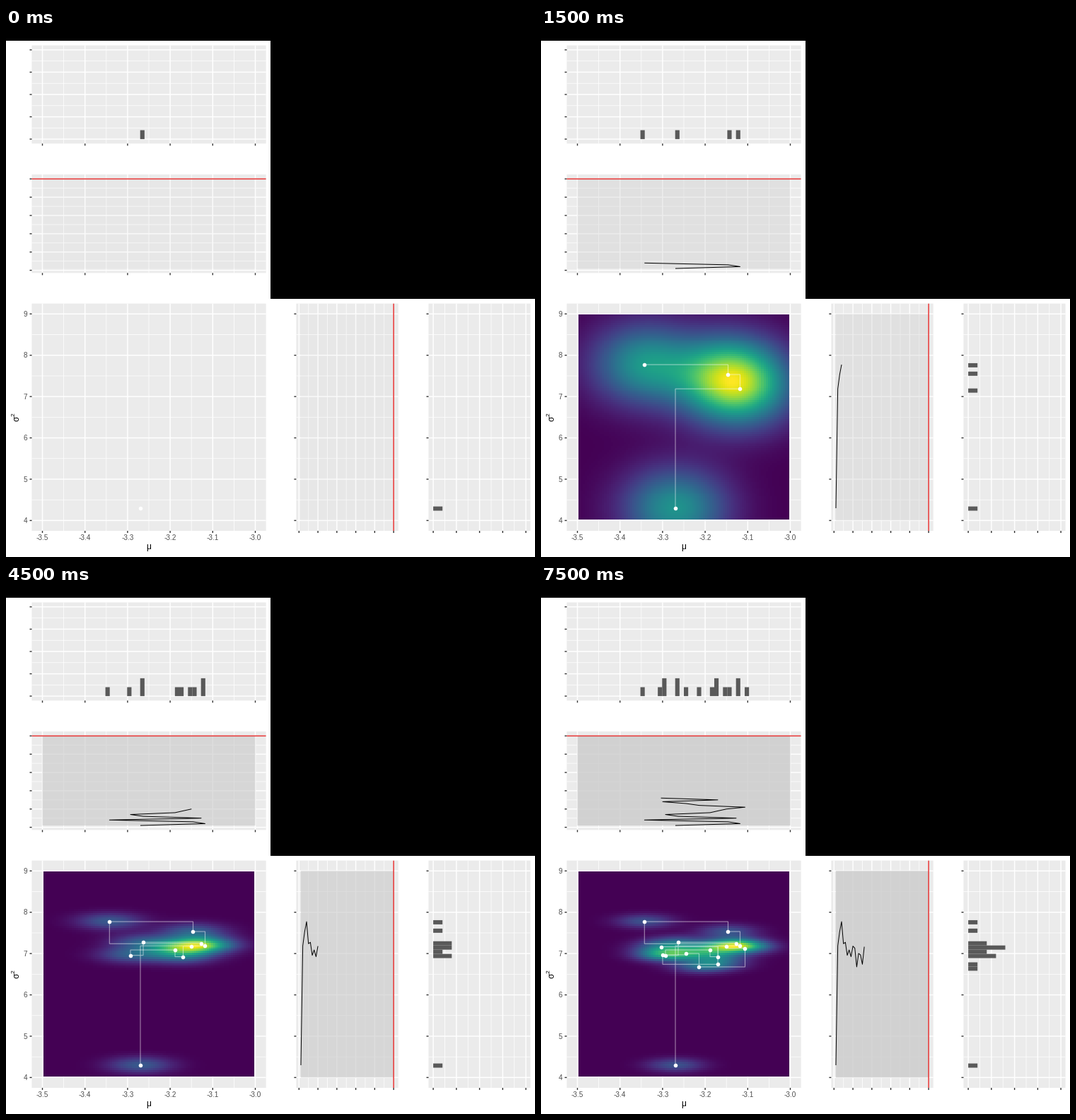
These frames come from a looping animation (748 px wide and 748 px high, 8000 ms). A matplotlib script:

```python
import numpy as np
import matplotlib.pyplot as plt
from matplotlib.animation import FuncAnimation
from matplotlib.patches import Rectangle

plt.rcParams["path.snap"] = False
plt.rcParams["font.family"] = "Liberation Sans"

SIZE, DPI = 748, 100
PT = 72 / DPI  # points per pixel

# Pixel scales of the five panels
X0, X1 = 51.5, 352.5        # mu from -3.5 to -3.0
Y0, Y1 = 696.4, 404.3       # sigma^2 from 4 to 9
B0, BSTEP = 342.6, -2.584   # iteration axis of the mu trace
D0, DSTEP = 414.3, 2.676    # iteration axis of the sigma^2 trace
A0, ASTEP = 157.1, -12.62   # counts of mu
E0, ESTEP = 604.1, 13.1     # counts of sigma^2
BIN_X, BIN_Y = 301 / 49, 5.96

# Sampler states (sigma^2 is updated first, then mu), in pixels
MU = np.array([190, 281.5, 264.5, 146.3, 276, 194, 176, 239,
               250.5, 262.3, 288.5, 223.5, 205.2, 172, 250, 169.6])
SIG = np.array([679, 510.2, 490, 476, 507.2, 505.2, 523.6, 516,
                525.6, 510.6, 513.5, 540, 521, 523, 536.3, 511.5])
STEPS = len(MU)

fig = plt.figure(figsize=(SIZE / DPI, SIZE / DPI), dpi=DPI, facecolor="black")
ax = fig.add_axes([0, 0, 1, 1])
ax.axis("off")


def box(x0, y0, x1, y1, color, z=0, **kw):
    return ax.add_patch(Rectangle((x0, y0), x1 - x0, y1 - y0, fc=color,
                                  lw=0, zorder=z, **kw))


def line(xs, ys, color, width, z, **kw):
    kw.setdefault("solid_capstyle", "butt")
    return ax.plot(xs, ys, color=color, lw=width * PT, zorder=z, **kw)[0]


def panel(x0, y0, x1, y1, xs, ys):
    """Grey panel with major and minor grid lines and outer ticks."""
    box(x0, y0, x1, y1, "#ebebeb", 1)
    for x in (xs[:-1] + xs[1:]) / 2:
        line([x, x], [y0, y1], "white", 0.75, 2)
    for y in (ys[:-1] + ys[1:]) / 2:
        line([x0, x1], [y, y], "white", 0.75, 2)
    for x in xs:
        line([x, x], [y0, y1], "white", 1.5, 2)
        line([x, x], [y1, y1 + 3], "#333333", 1.4, 2)
    for y in ys:
        line([x0, x1], [y, y], "white", 1.5, 2)
        line([x0 - 3, x0], [y, y], "#333333", 1.4, 2)


def label(x, y, s, size, color="#4d4d4d", ha="center", **kw):
    ax.text(x, y, s, fontsize=size * PT, color=color, ha=ha,
            va="baseline", zorder=5, **kw)


box(0, 18, 374, 383, "white")
box(0, 383, SIZE, SIZE, "white")

mu_ticks = np.linspace(X0, X1, 6)
sig_ticks = np.linspace(Y0, Y1, 6)
iters = np.arange(0, 51, 10)
counts = np.arange(0, 11, 2.5)
panel(36.5, 24.6, 367.6, 163.4, mu_ticks, A0 + ASTEP * counts)
panel(36.5, 207.1, 367.6, 346.4, mu_ticks, B0 + BSTEP * iters)
panel(36.5, 389.7, 367.6, 711, mu_ticks, sig_ticks)
panel(410.4, 389.7, 554.7, 711, D0 + DSTEP * iters, sig_ticks)
panel(597.5, 389.7, 741.6, 711, E0 + ESTEP * counts, sig_ticks)

for i in range(6):
    label(mu_ticks[i], 724, f"{-3.5 + i / 10:.1f}", 10)
    label(30.5, sig_ticks[i] + 3.6, str(4 + i), 10, ha="right")
label(202, 736.5, "μ", 12, "black")
turned = dict(ha="left", rotation=90, rotation_mode="anchor")
label(18.5, 556, "σ", 12, "black", **turned)
label(13, 549, "2", 8.5, "black", **turned)

# Trace panels: shading that deepens with each step, and the end lines
b1, b50 = B0 + BSTEP, B0 + BSTEP * 50
d1, d50 = D0 + DSTEP, D0 + DSTEP * 50
shades = [box(X0, b50, X1, b1, "#cccccc", 3),
          box(d1, Y1, d50, Y0, "#cccccc", 3)]
RED = "#e63232"
line([36.5, 367.6], [b50, b50], RED, 1.5, 4)
line([d50, d50], [389.7, 711], RED, 1.5, 4)

mu_trace = line([], [], "black", 1, 5, solid_joinstyle="round")
sig_trace = line([], [], "black", 1, 5, solid_joinstyle="round")
path = line([], [], "white", 1.1, 5, alpha=0.5, solid_joinstyle="miter")
dots = line([], [], "white", 0, 6, marker="o", ms=5.6 * PT, mew=0)

# Density raster: 100 x 100 grid whose outermost cells are cut off
GX = np.linspace(X0, X1, 100)[1:-1]
GY = np.linspace(Y1, Y0, 100)[1:-1]
hx, hy = (GX[1] - GX[0]) / 2, (GY[1] - GY[0]) / 2
field = ax.imshow(np.zeros((98, 98)), cmap="viridis", vmin=0, vmax=1,
                  extent=(GX[0] - hx, GX[-1] + hx, GY[-1] + hy, GY[0] - hy),
                  interpolation="nearest", aspect="auto", zorder=4)

mu_bars = [box(0, 0, 0, 0, "#595959", 4) for _ in range(50)]
sig_bars = [box(0, 0, 0, 0, "#595959", 4) for _ in range(50)]
ax.set_xlim(0, SIZE)
ax.set_ylim(SIZE, 0)


def bandwidth(v):
    q1, q3 = np.percentile(v, [25, 75])
    return 1.06 * min(v.std(ddof=1), (q3 - q1) / 1.34) * len(v) ** -0.2


def kernels(grid, v):
    return np.exp(-0.5 * ((grid[:, None] - v) / bandwidth(v)) ** 2)


def density(mu, sig):
    z = kernels(GY, sig) @ kernels(GX, mu).T
    return (z - z.min()) / (z.max() - z.min())


def tally(bins):
    return np.bincount(bins.astype(int), minlength=50)[:50]


def update(i):
    n = i + 1
    mu, sig, t = MU[:n], SIG[:n], np.arange(1, n + 1)

    field.set_visible(n > 1)
    if n > 1:
        field.set_data(density(mu, sig))
    dots.set_data(mu, sig)
    path.set_data(np.repeat(mu, 2)[:-1], np.repeat(sig, 2)[1:])
    mu_trace.set_data(mu, B0 + BSTEP * t)
    sig_trace.set_data(D0 + DSTEP * t, sig)
    for s in shades:
        s.set_alpha(1 - 0.9 ** n)

    for k, c in enumerate(tally((mu - X0) / BIN_X + 0.5)):
        mu_bars[k].set_bounds(X0 + (k - 0.5) * BIN_X, A0, BIN_X, ASTEP * c)
        mu_bars[k].set_visible(c > 0)
    for k, c in enumerate(tally((700.4 - sig) / BIN_Y)):
        sig_bars[k].set_bounds(E0, 700.4 - (k + 1) * BIN_Y, ESTEP * c, BIN_Y)
        sig_bars[k].set_visible(c > 0)
    return []


anim = FuncAnimation(fig, update, frames=STEPS, interval=500,
                     repeat=True, repeat_delay=0, blit=False)
plt.show()
```
